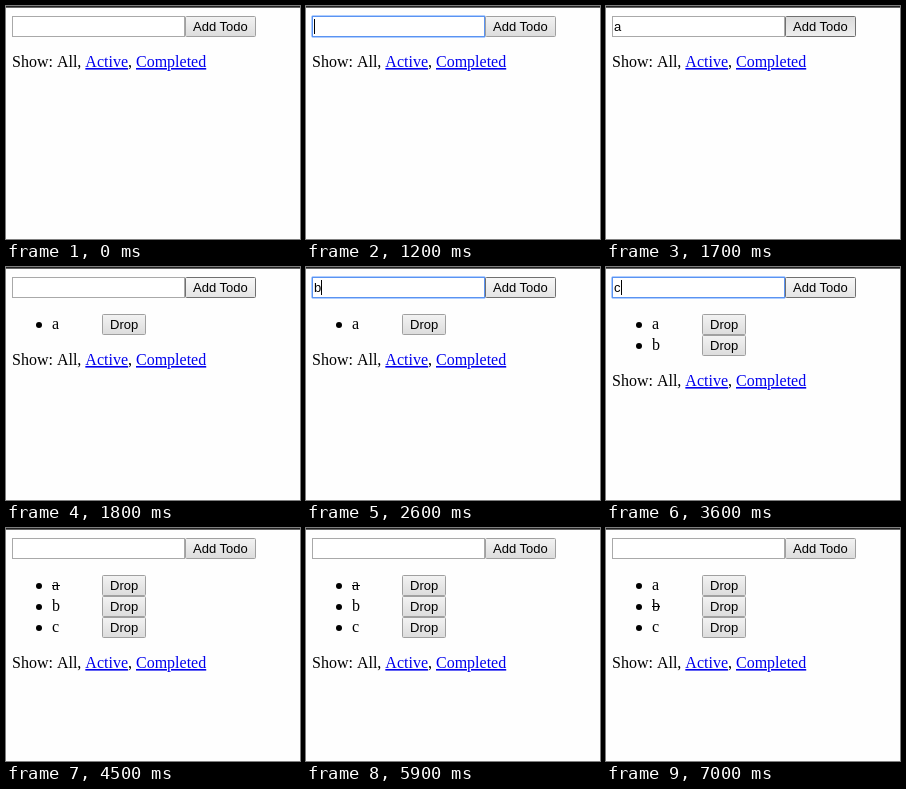
Animation, 294 px wide and 233 px high, one loop 8 s. Source, as an HTML page:

```html
<!DOCTYPE html>
<html lang="en">
<head>
<meta charset="utf-8">
<title>Todo list</title>
<style>
  html, body { margin: 0; width: 100%; height: 100%; overflow: hidden; background: #fefefe; }
  svg { display: block; }
  text { font: 16px "Liberation Serif", serif; font-kerning: none; white-space: pre; }
  .ui { font: 13px "Liberation Sans", sans-serif; font-kerning: normal; }
  .link {
    fill: #00e; text-decoration: underline 1px;
    text-underline-offset: 1px; text-decoration-skip-ink: none;
  }
  .button rect { fill: url(#normal); stroke: #a0a0a0; }
  .button.hover rect { fill: url(#hover); stroke: #707070; }
  .button.press rect { fill: url(#press); stroke: #707070; }
  .ring { fill: none; stroke: #4d90fe; }
</style>
</head>
<body>
<svg width="294" height="233" viewBox="0 0 294 233">
  <defs id="defs"></defs>
  <rect width="294" height="1" fill="#222"/>
  <rect y="1" width="294" height="1" fill="#666"/>
  <rect x="6.5" y="10.5" width="172" height="20" fill="#fff" stroke="#a9a9a9"/>
  <g id="focus">
    <rect class="ring" x="5.5" y="9.5" width="174" height="22" rx="1.5" opacity=".45"/>
    <rect class="ring" x="6.5" y="10.5" width="172" height="20" opacity=".85"/>
    <rect id="caret" y="13" width="1" height="15"/>
  </g>
  <text id="typed" class="ui" x="8" y="25"></text>
  <g id="rows"></g>
  <text id="filter" x="6">Show: All, <tspan class="link">Active</tspan>, <tspan class="link">Completed</tspan></text>
</svg>
<script>
const $ = id => document.getElementById(id);
const DURATION = 8000, ROW = 21;

const gradient = (id, top, bottom) =>
  `<linearGradient id="${id}" x2="0" y2="1"><stop stop-color="${top}"/><stop offset="1" stop-color="${bottom}"/></linearGradient>`;
$('defs').innerHTML = gradient('normal', '#f3f3f3', '#dcdcdc') +
  gradient('hover', '#f8f8f8', '#e4e4e4') + gradient('press', '#dcdcdc', '#eee');

const button = (x, y, width, label, id = '') =>
  `<g class="button" id="${id}"><rect x="${x + .5}" y="${y + .5}" width="${width - 1}" height="20" rx="1"/>
   <text class="ui" x="${x + 8}" y="${y + 15}">${label}</text></g>`;

const row = (name, i) => {
  const y = 47 + i * ROW;
  return `<g class="row"><circle cx="33" cy="${y + 11}" r="3"/>
    <text x="46" y="${y + 15}">${name}</text>
    <rect class="strike" x="46" y="${y + 10}" width="8" height="1"/>${button(96, y, 44, 'Drop')}</g>`;
};
$('rows').innerHTML = button(179, 10, 71, 'Add Todo', 'add') + ['a', 'b', 'c'].map(row).join('');
const rows = [...document.querySelectorAll('.row')];
const strikes = [...document.querySelectorAll('.strike')];

// Each step changes part of the state from its time on.
const start = { focus: false, typed: '', add: '', count: 0, done: -1 };
const focus = { focus: true };
const press = { add: 'press', focus: false };
const added = (count, add) => ({ count, add, typed: '' });
const steps = [
  [1200, focus], [1400, { typed: 'a' }], [1600, { add: 'hover' }], [1700, press],
  [1800, added(1, 'hover')], [2000, { add: '' }],
  [2200, focus], [2400, { typed: 'b' }], [2600, { add: 'hover' }], [2800, press],
  [2900, added(2, '')],
  [3100, focus], [3300, { typed: 'c' }], [3600, { add: 'hover' }], [3800, press],
  [3900, added(3, 'hover')], [4000, { add: '' }],
  [4500, { done: 0 }], [5300, { done: -1 }], [5900, { done: 0 }], [6700, { done: -1 }],
  [7000, { done: 1 }]
];

const show = (el, on) => el.setAttribute('visibility', on ? 'inherit' : 'hidden');

function draw(now) {
  const time = now % DURATION;
  const state = Object.assign({}, start, ...steps.filter(([at]) => at <= time).map(([, change]) => change));
  show($('focus'), state.focus);
  $('caret').setAttribute('x', state.typed ? 15 : 8);
  $('typed').textContent = state.typed;
  $('add').setAttribute('class', 'button ' + state.add);
  rows.forEach((el, i) => show(el, i < state.count));
  strikes.forEach((el, i) => show(el, i === state.done));
  $('filter').setAttribute('y', 61 + (state.count ? 16 + state.count * ROW : 0));
  requestAnimationFrame(draw);
}
draw(performance.now());
</script>
</body>
</html>
```
